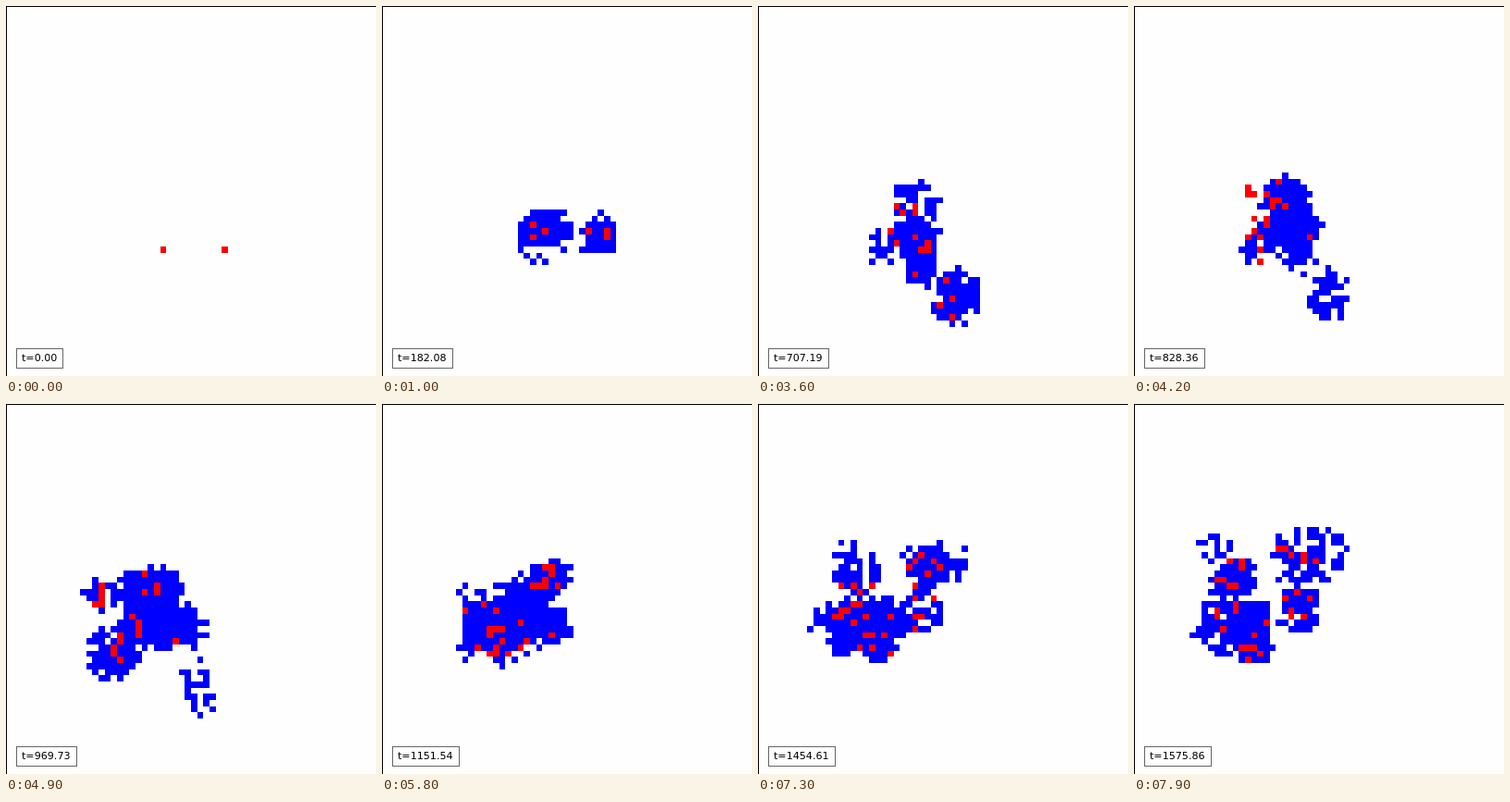
An HTML page with a canvas for the animation above (8000 ms loop, 400 by 400 pixels).

```html
<!DOCTYPE html>
<html lang="en">
<head>
<meta charset="utf-8">
<title>Cell spread</title>
<style>
  html, body { margin: 0; width: 100%; height: 100%; overflow: hidden; background: #fefefe; }
  canvas { position: absolute; left: 0; top: 0; }
  #clock {
    position: absolute; left: 11px; top: 370px; height: 20px;
    border: 1px solid #666; padding: 0 6px 0 5px; background: #fefefe;
    font: 11.11px/19px "DejaVu Sans", sans-serif; color: #000; white-space: pre;
  }
</style>
</head>
<body>
<canvas id="stage" width="400" height="400"></canvas>
<div id="clock"></div>
<script>
const GRID = 60, CELL = 400 / GRID, STEP = 100, STEPS = 80;
const ctx = document.getElementById('stage').getContext('2d');
const clock = document.getElementById('clock');
const scenes = [];

const lerp = (a, b, u) => a + (b - a) * u;

// Seeded random number in 0..1
function noise(a, b, c) {
  let h = Math.imul(a + 17, 374761393) ^ Math.imul(b + 5, 668265263) ^ Math.imul(c + 3, 2147483647);
  h = Math.imul(h ^ h >>> 13, 1274126177);
  h = Math.imul(h ^ h >>> 16, 2246822519);
  return ((h ^ h >>> 15) >>> 0) / 4294967296;
}

// How strongly the blobs fill a cell: above 1 is solid, below 0 is empty
function fillAt(c, r, blobs) {
  const fills = blobs.map(([x, y, rx, ry, most = 3]) => {
    const dx = Math.abs(c + 0.5 - x) / rx, dy = Math.abs(r + 0.5 - y) / ry;
    const d = (dx ** 2.5 + dy ** 2.5) ** 0.4;
    return Math.min(most, 2.4 * (1.2 - d));
  });
  return Math.max(-1, ...fills);
}

// Active cells: seeded places inside the dense blobs, each born from the nearest earlier one
function placeActive(step, blobs) {
  const dense = blobs.filter(([, , , , most = 3]) => most > 0.65);
  const prev = scenes[scenes.length - 1];
  const count = Math.round(2 + 0.38 * step);
  return Array.from({ length: count }, (_, i) => {
    const [x, y, rx, ry] = dense[i % dense.length];
    const angle = 2 * Math.PI * noise(i, step, 1), reach = 0.8 * Math.sqrt(noise(i, step, 2));
    const spot = { x: x + rx * reach * Math.cos(angle), y: y + ry * reach * Math.sin(angle) };
    const gap = p => Math.hypot(p.x - spot.x, p.y - spot.y);
    spot.parent = prev && prev.active.reduce((a, b) => gap(b) < gap(a) ? b : a);
    return spot;
  });
}

// Key shapes, in cells; each blob is [x, y, rx, ry, greatest fill]
function scene(step, lag, ...blobs) {
  const field = Array.from({ length: GRID * GRID },
    (_, i) => fillAt(i % GRID, Math.floor(i / GRID), blobs));
  scenes.push({ step, lag, field, active: placeActive(step, blobs) });
}

scene(0, 0, [25.5, 39.5, 0.1, 0.1], [35.5, 39.5, 0.1, 0.1]);
scene(10, 0.28, [26.6, 36.4, 3.9, 3.4], [35.3, 37.3, 2.9, 3.2], [25, 39.5, 3, 2.5, 0.4]);
scene(23, 0.39, [25.6, 33.3, 3.5, 4.3], [23, 39.5, 2.8, 2.3],
  [37.3, 38, 4, 4.2, 0.25], [27, 33.5, 3.2, 5.5, 0.4]);
scene(36, 0.19, [25, 37, 4.8, 2.5], [26.5, 40.5, 3, 4.5],
  [25.5, 32, 3.6, 3.4, 0.7], [32, 47, 3.8, 4.2, 0.75], [20, 39, 2.2, 2.6, 0.4]);
scene(49, 0.13, [23.4, 30.5, 5.2, 4], [25, 36, 6.8, 4],
  [17.5, 40, 4.2, 4.2, 0.88], [16, 31, 3, 2.6, 0.85], [31.2, 46, 2.6, 4.4, 0.45]);
scene(67, 0.16, [17.9, 35.2, 10.2, 3.6], [28.3, 27, 4.3, 3.7],
  [17, 38, 6.5, 3.3, 0.9], [24, 43.2, 3, 3.2, 0.42], [15.5, 27, 3.6, 4.2, 0.45]);
scene(79, 0.26, [16.5, 35.8, 6.3, 4.4, 0.95], [16.3, 28.2, 3.5, 3.6, 0.93],
  [28, 24.5, 6.2, 4.2, 0.72], [27, 33, 3, 4, 0.8], [19.3, 39.5, 3, 2.7], [13.2, 23.5, 2.6, 2.4, 0.4]);

function cell(c, r, color) {
  const x = Math.round(c * CELL), y = Math.round(r * CELL);
  ctx.fillStyle = color;
  ctx.fillRect(x, y, Math.round((c + 1) * CELL) - x, Math.round((r + 1) * CELL) - y);
}

function draw(step) {
  const n = Math.max(1, scenes.findIndex(s => s.step >= step));
  const from = scenes[n - 1], to = scenes[n];
  const u = (step - from.step) / (to.step - from.step);

  ctx.fillStyle = '#fefefe';
  ctx.fillRect(0, 0, 400, 400);

  // Each cell draws a new threshold every eight steps, at its own phase
  for (let i = 0; i < GRID * GRID; i++) {
    const c = i % GRID, r = Math.floor(i / GRID);
    const epoch = Math.floor(step / 8 + noise(c, r, 999));
    if (lerp(from.field[i], to.field[i], u) > noise(c, r, epoch)) cell(c, r, '#00f');
  }

  const sway = 3 * Math.sin(Math.PI * u), beat = Math.floor(step / 3);
  to.active.forEach(({ x, y, parent }, i) => cell(
    Math.floor(lerp(parent.x, x, u) + sway * (noise(i, beat, 3) - 0.5)),
    Math.floor(lerp(parent.y, y, u) + sway * (noise(i, beat, 4) - 0.5)),
    '#f00'
  ));

  ctx.fillStyle = '#000';
  ctx.fillRect(0, 0, 400, 1);
  ctx.fillRect(0, 0, 1, 400);

  const time = step ? (step - 1) * 20.2 + lerp(from.lag, to.lag, u) : 0;
  clock.textContent = 't=' + time.toFixed(2);
}

const start = performance.now();
let shown = -1;
function tick() {
  const step = Math.floor(Math.max(0, performance.now() - start) / STEP) % STEPS;
  if (step !== shown) draw(shown = step);
  requestAnimationFrame(tick);
}
tick();
</script>
</body>
</html>
```
